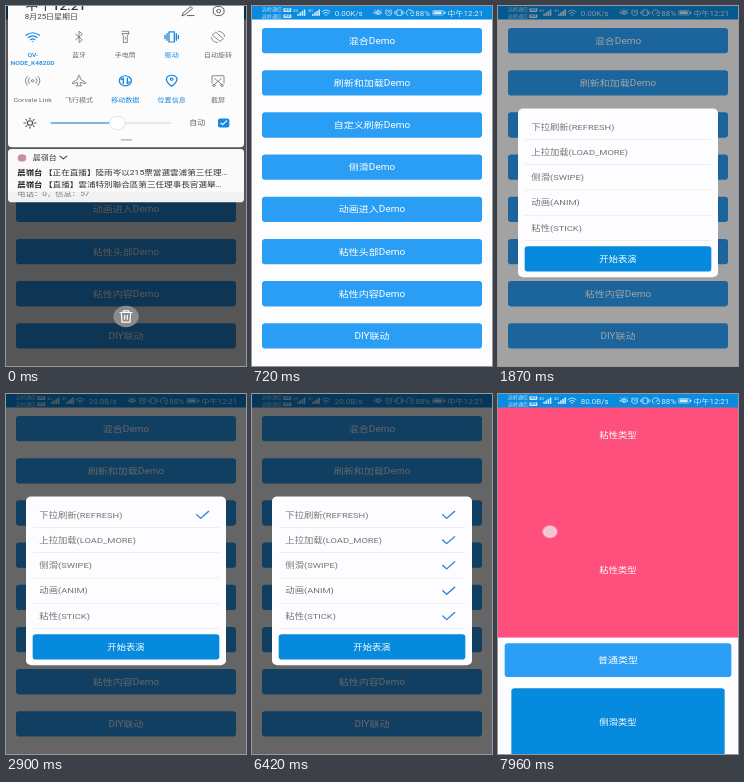
An HTML page that plays this animation: 240x360 px, repeating every 7990 ms.

```html
<!DOCTYPE html>
<html lang="zh">
<head>
<meta charset="utf-8">
<title>Demo</title>
<style>
html, body { margin: 0; width: 100%; height: 100%; overflow: hidden; background: #fdfdff; }
svg { display: block; width: 100vw; height: 100vh; }
text { font-family: Roboto, "Noto Sans CJK SC", "Noto Sans CJK", sans-serif; white-space: pre; }
</style>
</head>
<body>
<script>
// The phone screen is 360 x 640 units, squeezed into the stage.
const LOOP = 7990;
const W = 360, H = 640;
const BLUE = '#2a9df4', DEEP = '#068add', PINK = '#ff4f7c', PAPER = '#fdfdff';

function el(tag, attrs, parent) {
  const node = document.createElementNS('http://www.w3.org/2000/svg', tag);
  for (const k in attrs) node.setAttribute(k, attrs[k]);
  if (parent) parent.appendChild(node);
  return node;
}
const group = (parent, attrs = {}) => el('g', attrs, parent);
const rect = (p, x, y, width, height, fill, rx = 0) =>
  el('rect', { x, y, width, height, fill, rx }, p);
const circle = (p, cx, cy, r, fill, more = {}) =>
  el('circle', { cx, cy, r, fill, ...more }, p);
const line = (p, d, stroke, width = 1.5) =>
  el('path', { d, stroke, fill: 'none', 'stroke-width': width, 'stroke-linecap': 'round', 'stroke-linejoin': 'round' }, p);

// y is the middle of the line of text
function label(p, str, x, y, size, fill, anchor = 'middle', weight = 400) {
  const node = el('text', { x, y: y + size * 0.37, 'font-size': size, fill, 'text-anchor': anchor, 'font-weight': weight }, p);
  node.textContent = str;
  return node;
}
function button(p, str, x, y, w, h, fill, size) {
  rect(p, x, y, w, h, fill, 5);
  label(p, str, x + w / 2, y + h / 2, size, '#fff');
}
function icon(p, x, y, d, color, width = 1.5) {
  return line(group(p, { transform: `translate(${x} ${y})` }), d, color, width);
}

const svg = el('svg', { viewBox: `0 0 ${W} ${H}`, preserveAspectRatio: 'none' }, document.body);
rect(svg, 0, 0, W, H, PAPER);

const ICONS = {
  wifi: 'M-10-3Q0-12 10-3M-6.5 1Q0-5 6.5 1M-3 5Q0 2 3 5M0 8V8.1',
  bluetooth: 'M-5-5L5 5L0 10V-10L5-5L-5 5',
  torch: 'M-5-10H5V-6L3-2V10H-3V-2L-5-6H5M0 1V4',
  vibrate: 'M-4-9H4V9H-4ZM-7-6V6M7-6V6M-10-3V3M10-3V3',
  rotate: 'M-3-8L8 3L3 8L-8-3ZM1-10Q9-9 10-1M-1 10Q-9 9-10 1',
  share: 'M-5-5Q-9 0-5 5M5-5Q9 0 5 5M-8-8Q-14 0-8 8M8-8Q14 0 8 8M-2 0A2 2 0 1 0 2 0A2 2 0 1 0-2 0',
  plane: 'M0-10Q2-10 2-3L10 3V5L2 3V7L4 9H-4L-2 7V3L-10 5V3L-2-3Q-2-10 0-10',
  data: 'M-9 0A9 9 0 1 0 9 0A9 9 0 1 0-9 0M-3 5V-5L-6-2M3-5V5L6 2',
  place: 'M0 10Q-8 2-8-3A8 7 0 0 1 8-3Q8 2 0 10M-2-3A2 2 0 1 0 2-3A2 2 0 1 0-2-3',
  shot: 'M-9 4V-9H9V4M-5-4L5 6M5-4L-5 6M-8 8A2 2 0 1 0-4 8A2 2 0 1 0-8 8M4 8A2 2 0 1 0 8 8A2 2 0 1 0 4 8',
  pencil: 'M-8 8L-6 3L5-8L8-5L-3 6ZM0 8H10',
  gear: 'M-3-8H3L8-4V4L3 8H-3L-8 4V-4ZM-3 0A3 3 0 1 0 3 0A3 3 0 1 0-3 0',
  sun: 'M-4 0A4 4 0 1 0 4 0A4 4 0 1 0-4 0M0-9V-7M0 7V9M-9 0H-7M7 0H9M-6-6L-5-5M5 5L6 6M-6 6L-5 5M5-5L6-6',
  bin: 'M-9-7H9M-4-7V-10H4V-7M-7-7L-6 10H6L7-7M-2-2V5M2-2V5'
};

// Home list
const home = group(svg);
['混合Demo', '刷新和加载Demo', '自定义刷新Demo', '侧滑Demo', '动画进入Demo', '粘性头部Demo', '粘性内容Demo', 'DIY联动']
  .forEach((s, i) => button(home, s, 15, 39 + 75 * i, 330, 45, BLUE, 15));

// Result page
const page = group(svg);
rect(page, 0, 0, W, H, PAPER);
const content = group(page);
rect(content, 0, 24, W, 480, PINK);
label(content, '粘性类型', 180, 144, 14, '#fff');
label(content, '粘性类型', 180, 384, 14, '#fff');
button(content, '普通类型', 10, 514, 340, 60, BLUE, 15);
button(content, '侧滑类型', 20, 594, 320, 120, DEEP, 14);

// Status bar
const bar = group(svg);
rect(bar, 0, 0, W, 24, '#0a8bdf');
const ink = group(bar, { opacity: 0.82 });
[7, 18].forEach(y => {
  label(ink, '远岭通信', 15, y, 7.5, '#fff', 'start');
  rect(ink, 47, y - 3.5, 12, 7, '#fff', 1.5);
  label(ink, 'HD', 53, y, 6, '#0a8bdf', 'middle', 700);
});
[62, 84].forEach(x => {
  label(ink, '4G', x, 8, 6, '#fff', 'start');
  for (let i = 0; i < 4; i++) rect(ink, x + 6 + i * 3.2, 14 - i * 2.6, 2.4, 3.5 + i * 2.6, '#fff');
});
icon(ink, 111, 12, 'M-6-2Q0-8 6-2M-4 1Q0-3 4 1M-1.5 4Q0 2.5 1.5 4', '#fff', 1.4);
const speed = label(ink, '', 124, 12.5, 12, '#fff', 'start');
icon(ink, 189, 12, 'M-6 0Q0-6 6 0Q0 6-6 0M-2 0A2 2 0 1 0 2 0A2 2 0 1 0-2 0M-4-4L-5-5M4-4L5-5M0-4V-6', '#fff', 1.3);
icon(ink, 205, 12.5, 'M-4.5 0A4.5 4.5 0 1 0 4.5 0A4.5 4.5 0 1 0-4.5 0M0-2V0H2M-5-4L-3-6M5-4L3-6', '#fff', 1.2);
icon(ink, 221, 12, 'M-3-5H3V5H-3ZM-5-3V3M5-3V3M-7-1.5V1.5M7-1.5V1.5', '#fff', 1.2);
icon(ink, 237, 12, 'M-3 5A5.5 5.5 0 1 1 5 2M0 2L3-2M2 5H5', '#fff', 1.4);
label(ink, '88%', 245, 12.5, 12, '#fff', 'start');
el('rect', { x: 271, y: 8, width: 16, height: 8, rx: 1, fill: 'none', stroke: '#fff' }, ink);
rect(ink, 272.5, 9.5, 12, 5, '#fff');
rect(ink, 288, 10, 2, 4, '#fff');
label(ink, '中午12:21', 347, 12.5, 12, '#fff', 'end');

// Pointer resting in the corner, below the dimming
const rest = circle(svg, 21, 25, 12, '#d8d8dc');

// Dialog
const dim = rect(svg, 0, 0, W, H, '#000');
const dialog = group(svg);
rect(dialog, 30, 182, 300, 300, PAPER, 8);
const rowY = i => 214.5 + 45 * i;
const ticks = ['下拉刷新(REFRESH)', '上拉加载(LOAD_MORE)', '侧滑(SWIPE)', '动画(ANIM)', '粘性(STICK)'].map((s, i) => {
  label(dialog, s, 50, rowY(i), 14, '#757577', 'start');
  rect(dialog, 40, rowY(i) + 22, 280, 1, '#e3e3e5');
  return icon(dialog, 295, rowY(i), 'M-9 0L-3 6.5L9-6', '#3585e2', 2.2);
});
button(dialog, '开始表演', 40, 427, 280, 45, DEEP, 14);

// Notification shade
const shadeDim = rect(svg, 0, 0, W, H, '#000');
const bin = group(svg);
circle(bin, 180, 552, 19, '#8b8b8b');
icon(bin, 180, 552, ICONS.bin, '#fff', 1.8);

const shade = group(svg);
const GREY = '#6d6d70', ACCENT = '#1787e0';
rect(shade, 3, 280, 354, 69, '#f2f2f3', 6);
label(shade, '电话：0，信息：57', 17, 333, 12.5, '#777', 'start');
rect(shade, 3, 254, 354, 76, '#fafafa', 6);
rect(shade, 3, -30, 354, 281, '#fcfcfd', 6);
label(shade, '中午12:21', 29, -1, 20, '#333', 'start', 500);
label(shade, '8月25日星期日', 28, 18, 12, '#444', 'start');
icon(shade, 272, 9, ICONS.pencil, '#555');
icon(shade, 319, 9, ICONS.gear, '#555');

const toggles = [
  ['wifi', '', 1], ['bluetooth', '蓝牙'], ['torch', '手电筒'], ['vibrate', '振动', 1], ['rotate', '自动旋转'],
  ['share', 'Corvale Link'], ['plane', '飞行模式'], ['data', '移动数据', 1], ['place', '位置信息', 1], ['shot', '截屏']
];
toggles.forEach(([name, text, on], i) => {
  const x = 40 + 69.5 * (i % 5), second = i > 4;
  const color = on ? ACCENT : GREY;
  icon(shade, x, second ? 133 : 55, ICONS[name], color, on ? 2 : 1.3);
  label(shade, text, x, second ? 166 : 87, 10.6, color, 'middle', on ? 500 : 400);
});
label(shade, 'QV-', 40, 87, 10, ACCENT, 'middle', 500);
label(shade, 'NODE_K4820D', 40, 102, 10, ACCENT, 'middle', 500);

icon(shade, 36, 208, ICONS.sun, '#555', 2);
line(shade, 'M68 208H247', '#d5d5d8', 2);
line(shade, 'M68 208H166', ACCENT, 2);
circle(shade, 167, 208, 12, '#fff', { stroke: '#d2d2d5' });
label(shade, '自动', 287, 208, 12, '#666');
rect(shade, 318, 200, 17, 16, ACCENT, 3);
line(shade, 'M322 208L325 211L331 204', '#fff', 1.8);
line(shade, 'M173 238H188', '#aaa', 2);

circle(shade, 24, 270, 6.5, '#c98d9c');
label(shade, '晨嶺台', 40, 270, 12, '#333', 'start');
line(shade, 'M81 267L86 272L91 267', '#444', 1.8);
[['【正在直播】陸雨岑以215票當選雲浦第三任理…', 295], ['【直播】雲浦特別聯合區第三任理事長官選舉…', 317]].forEach(([s, y]) => {
  label(shade, '晨嶺台', 17, y, 12.6, '#222', 'start', 700);
  label(shade, s, 57, y, 12.9, '#333', 'start');
});

// Touch pointer
const touch = group(svg);
circle(touch, 0, 0, 12, '#fff', { opacity: 0.3 });
circle(touch, 0, 0, 9.5, '#e9e5e8', { opacity: 0.7, stroke: '#fff', 'stroke-width': 1.5 });

const clamp = v => Math.max(0, Math.min(1, v));
const ramp = (t, a, b) => clamp((t - a) / (b - a));
const pulse = (t, a, b, c, d) => ramp(t, a, b) * (1 - ramp(t, c, d));
const easeInOut = p => (1 - Math.cos(Math.PI * p)) / 2;
const show = (node, on) => node.setAttribute('display', on ? 'inline' : 'none');
const move = (node, x, y) => node.setAttribute('transform', `translate(${x} ${y})`);
const fade = (node, v) => { show(node, v > 0); node.setAttribute('opacity', v); };

const tickTimes = [2480, 3300, 4340, 5520, 5920];
// start, end, x, y, and the way moved upwards
const taps = [
  [1440, 1600, 195, 64],
  ...tickTimes.map((t, i) => [t - 150, t + 20, 240, rowY(i)]),
  [6440, 6570, 210, 450],
  [7765, 8100, 78, 324, 79]
];

function draw(t) {
  const up = easeInOut(ramp(t, 100, 690));
  move(shade, 0, -354 * up);
  show(shade, up < 1);
  fade(shadeDim, 0.66 * (1 - up));
  fade(bin, 1 - ramp(t, 100, 320));

  // The backdrop darkens more slowly than the dialog appears
  fade(dim, 0.6 * pulse(t, 1630, 2030, 6580, 6820));
  fade(dialog, pulse(t, 1630, 1850, 6580, 6700));
  fade(rest, 0.5 * pulse(t, 4640, 4680, 4740, 4840));
  ticks.forEach((tick, i) => show(tick, t >= tickTimes[i]));

  const enter = easeInOut(ramp(t, 6690, 6900));
  show(page, enter > 0);
  move(page, W * (1 - enter), 0);
  const left = 1 - ramp(t, 6913, 7590);
  move(content, W * left * left, -71 * ramp(t, 7780, 7960));

  speed.textContent = t < 2600 ? '0.00K/s' : t < 6700 ? '20.0B/s' : '80.0B/s';

  const tap = taps.find(([a, b]) => t >= a && t < b + 40);
  show(touch, tap);
  if (tap) {
    const [a, b, x, y, rise = 0] = tap;
    move(touch, x, y - rise * ramp(t, a, 7960));
    touch.setAttribute('opacity', pulse(t, a - 20, a + 20, b, b + 40));
  }
}

const start = performance.now();
function tick() {
  draw((performance.now() - start) % LOOP);
  requestAnimationFrame(tick);
}
tick();
</script>
</body>
</html>
```
